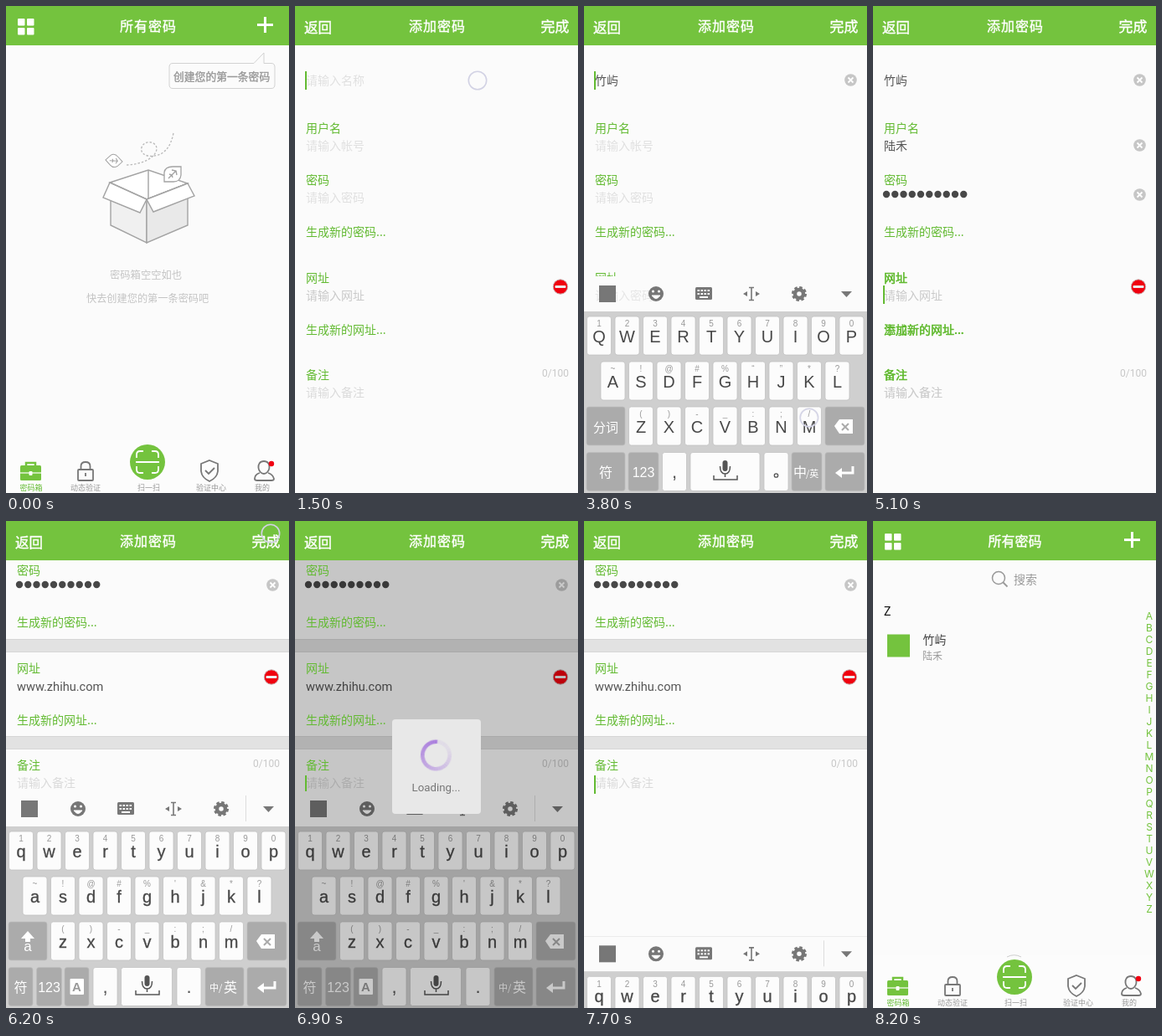
An HTML page for the animation above (8600 ms loop, 338 by 582 pixels).

```html
<!DOCTYPE html>
<html lang="zh-CN">
<head>
<meta charset="utf-8">
<title>添加密码</title>
<style>
html, body { margin: 0; width: 100%; height: 100%; overflow: hidden; background: #fbfbfb; }
svg { display: block; width: 338px; height: 582px; }
text { font-family: "Noto Sans CJK SC", "Noto Sans CJK", "Noto Sans", sans-serif; white-space: pre; }
.lat { font-family: Roboto, "Open Sans", sans-serif; }
.key { font-family: "Liberation Sans", Arial, sans-serif; }
.index { font-family: Inter, sans-serif; }
.head { stroke: #fff; stroke-width: .4px; }
.title { letter-spacing: 1px; }
#dialog { transform-origin: 169px 293px; }
#spin { transform-origin: 168.5px 280px; }
</style>
</head>
<body>
<svg id="stage" viewBox="0 0 338 582" xmlns="http://www.w3.org/2000/svg"></svg>
<script>
const LOOP = 8600, GREEN = '#74c33e', LABEL = '#62ba31', PAGE = '#fbfbfb';
const NAME = '竹屿', USER = '陆禾';

// Drawing helpers; text is placed by the middle of its capitals
const text = (x, y, s, size, fill, more = '') =>
  `<text x="${x}" y="${y + size * .38}" font-size="${size}" fill="${fill}" ${more}>${s}</text>`;
const mid = (x, y, s, size, fill, more = '') => text(x, y, s, size, fill, 'text-anchor="middle" ' + more);
const bold = (x, y, s, size, fill) => text(x, y, s, size, fill, `stroke="${fill}" stroke-width=".4"`);
const rect = (x, y, w, h, fill, r = 0, more = '') =>
  `<rect x="${x}" y="${y}" width="${w}" height="${h}" rx="${r}" fill="${fill}" ${more}/>`;
const circle = (x, y, r, fill, more = '') => `<circle cx="${x}" cy="${y}" r="${r}" fill="${fill}" ${more}/>`;
const line = (d, stroke, w = 1, fill = 'none', more = '') =>
  `<path d="${d}" stroke="${stroke}" stroke-width="${w}" fill="${fill}" ${more}/>`;
const group = (id, ...parts) => `<g id="${id}">${parts.join('')}</g>`;
const list = (n, f) => Array.from({ length: n }, (_, i) => f(i)).join('');
const LAT = 'class="lat"', KEY = 'class="key"', HEAD = 'class="head"', TITLE = 'class="head title"';

function tabBar() {
  const g = '#777', labels = [[30, '密码箱', LABEL], [95, '动态验证'], [170.5, '扫一扫'], [245, '验证中心'], [306, '我的']];
  return rect(0, 519, 338, 63, '#fcfcfc') +
    rect(17, 549, 25, 18, GREEN, 1.5) + line('M24 549V546H35V549', GREEN, 2.5) +
    line('M17 558H42', '#fff', 1.2) + rect(27.5, 556, 4, 5, '#fff', 1) +
    rect(86, 554, 18, 13, 'none', 1, `stroke="${g}" stroke-width="1.8"`) +
    line('M89.5 554V550Q89.5 545 95 545T100.5 550V554M95 558V562', g, 1.8) +
    circle(169, 545, 21, GREEN) +
    line('M156 540V536Q156 532 160 532H164M174 532H178Q182 532 182 536V540M182 550V554Q182 558 178 558H174M164 558H160Q156 558 156 554V550M155 545H183', '#fff', 1.8) +
    line('M243 543L253 547V556Q252 564 243 568Q234 564 233 556V547Z', g, 1.8) +
    line('M238 555L242 559L249 552', g, 1.8) +
    line('M308 544C313 544 315 548 314.5 552C314 556 311 559 308 559C305 559 302 556 301.5 552C301 548 303 544 308 544ZM303 558Q297 560 297 565Q297 567 300 567H317Q320 567 320 565Q319 560 313 558', g, 1.8) +
    circle(317, 547, 3.2, '#f00012') +
    labels.map(([x, s, c = '#999']) => mid(x, 576, s, 9, c)).join('');
}

function emptyHome() {
  const s = '#a3a3a3', leaf = (x, y, r, k) =>
    `<g transform="translate(${x} ${y}) rotate(${r}) scale(${k})">` +
    line('M-10 9V-2Q-9 -9 0 -9H10V1Q9 9 1 9Z', s, 1.3, '#fff') +
    line('M-5 5L4 -4M-1 -5L4 -4L5 1M-4 0L-1 1L0 4', s, 1.4) + '</g>';
  return rect(0, 47, 338, 535, PAGE) +
    line('M199 68.5H296L308 56V68.5H317Q321 68.5 321 73V94Q321 98.5 317 98.5H199Q195 98.5 195 94V73Q195 68.5 199 68.5Z', '#d2d2d2') +
    bold(200, 84, '创建您的第一条密码', 12.8, '#999') +
    line('M200 152Q195 177 177 179C166 181 160 175 162 169C165 160 179 161 180 170C180 181 162 190 142 190', '#bbb', 1.4, 'none', 'stroke-dasharray="2.5 2"') +
    line('M124 211L170 196L217 212L168 231Z', s, 1.4, '#fff') + line('M170 196V231', s, 1.4) +
    line('M125 212V262L168 283V231Z', s, 1.4, '#f0f0f0') + line('M217 212V262L168 283V231Z', s, 1.4, '#e9e9e9') +
    line('M124 211L168 231L160 247L116 229Z', s, 1.4, '#fff') + line('M217 212L225 227L176 246L168 231Z', s, 1.4, '#fff') +
    leaf(129, 185, 48, .75) + leaf(199, 201, 0, 1) +
    text(124, 321, '密码箱空空如也', 12.3, '#c4c4c4') +
    text(96, 349, '快去创建您的第一条密码吧', 12.2, '#c4c4c4');
}

function savedList() {
  return rect(0, 47, 338, 535, PAGE) +
    circle(150, 68, 7.5, 'none', 'stroke="#999" stroke-width="1.5"') + line('M155.5 73.5L160.5 78.5', '#999', 1.8) +
    text(168, 70, '搜索', 14, '#999') + text(13, 108, 'Z', 14, '#111', LAT) +
    rect(17, 135.5, 27, 27, GREEN) +
    text(59.5, 142, NAME, 14, '#444') + text(59, 161, USER, 12, '#999') +
    list(26, i => mid(330, 113 + i * 14, String.fromCharCode(65 + i), 12, GREEN, 'class="index"'));
}

const header = rect(0, 0, 338, 47, GREEN);
const homeIcons = [14, 25].map(x => [15, 26].map(y => rect(x, y, 8.5, 8.5, '#fff', 1)).join('')).join('') +
  line('M300 22.5H319M309.5 13V32', '#fff', 3);

const clearIcon = y => circle(318.5, y, 7.3, '#c6c6c6') +
  line(`M315.5 ${y - 3}l6 6m0 -6l-6 6`, '#fff', 1.8);
const hint = (y, s, c = '#e0e0e0') => text(13, y, s, 14, c);

const fields = () =>
  group('bands', ...[290, 406].map(y => rect(0, y, 338, 16, '#e2e2e2') + line(`M0 ${y}.5H338M0 ${y + 15}.5H338`, '#d6d6d6'))) +
  group('nameHint', hint(89, '请输入名称')) + group('userHint', hint(167, '请输入帐号')) +
  group('passHint', hint(229, '请输入密码')) + group('urlHint', hint(346, '请输入网址', '#c9c9c9')) +
  hint(462, '请输入备注', '#dadada') +
  group('name', text(13, 89, NAME, 14, '#555'), clearIcon(88.5)) +
  group('user', text(13, 167, USER, 14, '#555'), clearIcon(166.5)) +
  group('pass', list(10, i => circle(16 + i * 10.25, 225, 4.2, '#484848')), clearIcon(225.5)) +
  group('url', text(13, 346, 'www.zhihu.com', 14.6, '#555', LAT)) +
  circle(317, 335.5, 8.7, '#f0000f', 'stroke="#c9b5b5"') + rect(310.5, 334, 13, 3, '#eee', 1) +
  text(295, 438, '0/100', 12, '#c8c8c8', LAT);

const labels = () =>
  [[146, '用户名'], [208, '密码'], [270, '生成新的密码...'], [325, '网址'], [387, '生成新的网址...'], [441, '备注']]
    .map(([y, s]) => text(13, y, s, 14, LABEL)).join('') +
  group('heavy', ...[[325, '网址'], [387, '添加新的网址...'], [441, '备注']].map(([y, s]) => bold(13, y, s, 14, LABEL)), hint(462, '请输入备注', '#ccc')) +
  group('caret', rect(12, 0, 2, 22, LABEL));

function toolbar(en) {
  const c = '#777';
  return rect(0, 323, 338, 42, PAGE) + (en ? line('M286.5 328V359', '#ddd') : hint(346, '请输入密码', '#e6e6e6')) +
    rect(18, 334, 20, 20, c) +
    circle(86, 344, 9, c) + circle(82.5, 341, 1.5, '#fff') + circle(89.5, 341, 1.5, '#fff') + line('M81 346Q86 353 91 346Z', '#fff', 1, '#fff') +
    rect(133, 336, 20, 15, c, 1.5) +
    list(2, r => list(4, i => rect(135.5 + i * 4, 339 + r * 4, 2.5, 2, '#fff'))) + rect(138, 347, 10, 2, '#fff') +
    line('M200 337V351M197 336.5H203M197 351.5H203', c, 1.6) +
    line('M190 344L195 341V347ZM210 344L205 341V347Z', 'none', 0, c) +
    circle(257, 344, 5, 'none', `stroke="${c}" stroke-width="4.5"`) +
    circle(257, 344, 7.8, 'none', `stroke="${c}" stroke-width="2.5" stroke-dasharray="3.6 2.525"`) +
    line('M307 341H320L313.5 348Z', 'none', 0, c);
}

function keyboard(en) {
  const cap = (x, y, w, fn) => rect(x, y, w, 46, fn ? '#ababab' : '#fcfcfc', 3, 'stroke="#bdbdbd" stroke-width=".7"');
  const rows = [['QWERTYUIOP', '1234567890', 3.5, 371], ['ASDFGHJKL', en ? "~!@#%'&*?" : '~!@#%“”*?', 20, 425], ['ZXCVBNM', '()-_:;/', 53.5, 479]];
  let out = toolbar(en) + rect(0, 365, 338, 217, '#cfcfcf');
  for (const [keys, marks, x0, y] of rows)
    [...keys].forEach((k, i) => {
      const x = x0 + i * 33.5;
      out += cap(x, y, 29) + mid(x + 14.5, y + 8.5, marks[i].replace('&', '&amp;'), 10, '#999', KEY) +
        mid(x + 14.5, y + 23.5, en ? k.toLowerCase() : k, 20, '#484848', KEY + (en ? ' stroke="#484848" stroke-width=".3"' : ''));
    });
  const w = '#fff', d = '#555';
  out += cap(3, 479, 46, 1) + cap(288, 479, 47, 1) +
    line('M299 502L305 494H321V511H305Z', 'none', 0, w) + line('M308 499L316 507M316 499L308 507', '#aaa', 2);
  out += en ? line('M26 490L34 499H29V503H23V499H18Z', 'none', 0, w) + mid(26, 508, 'a', 17, w, KEY) : mid(26, 503, '分词', 15, w);
  const low = en
    ? [[3, 29, 1], [36.5, 30, 1], [70, 29, 1], [104, 29], [137.5, 61], [204, 29], [238, 46, 1], [288, 47, 1]]
    : [[3, 46, 1], [53, 36, 1], [93.5, 29], [127, 83], [215, 29], [248, 36, 1], [288, 47, 1]];
  out += low.map(([x, kw, fn]) => cap(x, 533.5, kw, fn)).join('');
  out += mid(en ? 17.5 : 26, 557, '符', 16, w) + mid(en ? 51.5 : 71, 557, '123', 16, w, KEY) +
    mid(en ? 118.5 : 108, 556, ',', 22, d, KEY) + (en ? mid(218.5, 556, '.', 22, d, KEY) : circle(229.5, 561, 2.2, 'none', `stroke="${d}" stroke-width="1.3"`)) +
    (en ? text(243, 558, '中/', 11, w) + text(260, 557, '英', 16, w) : text(250, 557, '中', 16, w) + text(265, 559, '/英', 11, w)) +
    (en ? rect(76.5, 547, 16.5, 19, w, 1) + mid(84.5, 556, 'A', 15, '#999', KEY + ' font-weight="700"') : '') +
    rect(165.5, 543, 6, 13, d, 3) + line('M162.5 550Q162.5 559 168.5 559T174.5 550M168.5 559V563M155 561V566H183V561', d, 1.5) +
    line('M321 550V558H306', w, 3) + line('M308 552V564L300 558Z', 'none', 0, w);
  return out;
}

const veil = (id, y) => group(id, rect(0, y, 338, 582 - y, '#000'));
const polar = (a, r) => `${168.5 + r * Math.sin(a)} ${280 - r * Math.cos(a)}`;
const SEG = 36, ARC = Math.PI * 2 / SEG;
const spinner = list(SEG, i =>
  line(`M${polar(-i * ARC, 16.2)}A16.2 16.2 0 0 0 ${polar(-(i + 1.08) * ARC, 16.2)}`, '#a87bdd', 4.6, 'none',
    `opacity="${Math.max(.1, 1 - i / SEG * 1.1)}"`));

document.getElementById('stage').innerHTML =
  rect(0, 0, 338, 582, PAGE) +
  group('home', emptyHome()) + group('list', savedList()) + tabBar() +
  group('arc', line('M160 521Q168.5 516.5 177 521', '#ccc')) +
  group('form', rect(0, 47, 338, 535, PAGE), group('page', fields()), veil('dimPage', 47), group('marks', labels())) +
  group('board', group('cn', keyboard(false)), group('en', keyboard(true)), veil('dimBoard', 323)) +
  group('popup', rect(145, 423, 47.5, 53, '#fff', 3, 'stroke="#ddd"'), mid(168.5, 447, 'V', 38, '#ef7d4f', KEY)) +
  header + homeIcons +
  group('titleA', mid(170, 23.5, '所有密码', 16, '#fff', TITLE)) +
  group('titleB', mid(169.5, 23.5, '所有密码', 16, '#fff', HEAD)) +
  group('formHead', header, text(11, 26, '返回', 16.5, '#fff', HEAD), mid(170, 23.5, '添加密码', 16, '#fff', TITLE), text(293.5, 25, '完成', 17, '#fff', HEAD)) +
  group('dialog', rect(116, 237, 106, 113, '#e8e8e8', 4), group('spin', spinner), mid(168.5, 317.5, 'Loading...', 13.3, '#777', LAT)) +
  group('cursor', circle(0, 0, 10.7, 'none', 'stroke="#d2d2e4" stroke-width="1.6"'));

// Motion advances on a 100 ms beat; two entries at one time make a cut
function track(id, prop, steps) {
  const all = [...steps, [LOOP, steps[steps.length - 1][1]]];
  const frames = all.map(([t, v], i) => {
    const n = i + 1 < all.length ? Math.max(1, Math.round((all[i + 1][0] - t) / 100)) : 1;
    return { offset: t / LOOP, [prop]: v, easing: `steps(${n}, end)` };
  });
  document.getElementById(id).animate(frames, { duration: LOOP, iterations: Infinity });
}
// Times alternate between on and off; each state is held until the next
function show(id, ...times) {
  const steps = times.map((t, i) => [t, 1 - i % 2]);
  if (times[0] > 0) steps.unshift([0, 0]);
  track(id, 'opacity', steps.flatMap(([t, v], i) => i ? [[t, 1 - v], [t, v]] : [[t, v]]));
}
const shift = (id, steps) => track(id, 'transform', steps.map(([t, x, y]) => [t, `translate(${x}px, ${y}px)`]));

show('home', 0, 1200);
show('titleA', 0, 1200);
show('titleB', 1200);
show('list', 1200);
show('arc', 1200);
shift('form', [[0, 338, 0], [600, 338, 0], [900, 0, 0], [7700, 0, 0], [8100, 338, 0]]);
track('formHead', 'opacity', [[0, 0], [600, 0], [900, 1], [7700, 1], [8000, 0]]);

shift('board', [[0, 0, 260], [1500, 0, 260], [1900, 0, 0], [4700, 0, 0], [5000, 0, 260], [5100, 0, 260], [5400, 0, 0], [7500, 0, 0], [7800, 0, 260]]);
show('cn', 0, 5100);
show('en', 5100);
show('popup', 2600, 2800);

for (const [id, t] of [['name', 3600], ['user', 4800], ['pass', 4900], ['url', 5500]]) {
  show(id, t);
  show(id + 'Hint', 0, t);
}
show('heavy', 4800, 5400);
show('bands', 5700);
for (const id of ['page', 'marks']) shift(id, [[0, 0, 0], [5700, 0, 0], [5700, 0, -149]]);

show('caret', 1500, 6200, 6300);
shift('caret', [[0, 0, 78], [4600, 0, 78], [4600, 0, 156], [4900, 0, 156], [4900, 0, 214], [5100, 0, 214], [5100, 0, 334], [5700, 0, 334], [5700, 0, 453]]);

show('cursor', 300, 700, 1500, 4800, 6200, 6700);
shift('cursor', [[0, 178, 153], [300, 178, 153], [500, 316, 15], [1500, 316, 15], [1500, 218, 89], [1900, 218, 89], [2600, 174, 509],
  [2800, 174, 509], [3300, 68, 502], [3900, 309, 490], [4200, 309, 490], [4600, 218, 166], [6200, 218, 166], [6200, 316, 15]]);

for (const id of ['dimPage', 'dimBoard'])
  track(id, 'opacity', [[0, 0], [6600, 0], [6900, .21], [7100, .53], [7500, .53], [7700, 0]]);
track('dialog', 'opacity', [[0, 0], [6600, 0], [6900, 1], [7400, 1], [7500, .72], [7700, 0]]);
track('dialog', 'transform', [[0, 'scale(1)'], [7400, 'scale(1)'], [7500, 'scale(.97)'], [7700, 'scale(.9)']]);
track('spin', 'transform', [[0, 'rotate(-43deg)'], [6700, 'rotate(-43deg)'], [7700, 'rotate(198deg)']]);
</script>
</body>
</html>
```
